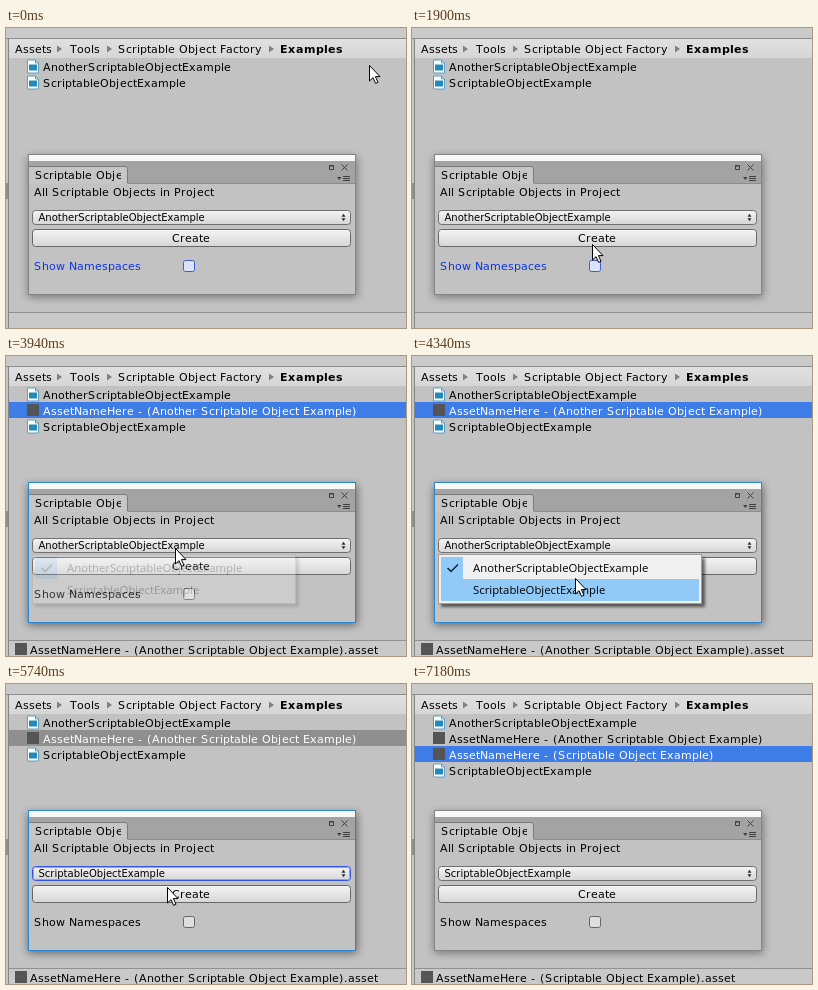
Recreate the animation shown at these times as an HTML page. Size 400x300 px, loop 7.32 s.

```html
<!DOCTYPE html>
<html lang="en">
<head>
<meta charset="utf-8">
<title>Scriptable object factory</title>
<style>
html, body { margin: 0; width: 100%; height: 100%; overflow: hidden; background: #c2c2c2; }
svg { display: block; width: 400px; height: 300px; }
text { font: 11px "DejaVu Sans", sans-serif; white-space: pre; }
text.bold { font-weight: bold; }
text.small { font-size: 10px; }
text.menu { font: 11.35px "Open Sans", sans-serif; }
</style>
</head>
<body>
<svg viewBox="0 0 400 300" xmlns="http://www.w3.org/2000/svg">
  <defs>
    <linearGradient id="face" x2="0" y2="1">
      <stop offset="0" stop-color="#f4f4f4"/><stop offset="1" stop-color="#d6d6d6"/>
    </linearGradient>
    <linearGradient id="pressed" x2="0" y2="1">
      <stop offset="0" stop-color="#b0b0b0"/><stop offset="1" stop-color="#c8c8c8"/>
    </linearGradient>
    <linearGradient id="bar" x2="0" y2="1">
      <stop offset="0" stop-color="#e0e0e0"/><stop offset="1" stop-color="#d6d6d6"/>
    </linearGradient>
    <filter id="blur" x="-10%" y="-20%" width="120%" height="140%"><feGaussianBlur stdDeviation="4"/></filter>
    <filter id="soft" x="-10%" y="-20%" width="120%" height="140%"><feGaussianBlur stdDeviation="1.5"/></filter>
    <clipPath id="tab"><rect x="22" y="136" width="93" height="20"/></clipPath>
  </defs>
  <g id="back"></g>
  <g id="list"></g>
  <g id="panel"></g>
  <g id="popup"></g>
  <path id="cursor" d="M.5.5V16L4 12.6 6.6 18.4 9 17.3 6.4 11.6H11Z" fill="#fff" stroke="#000" stroke-width="1"/>
</svg>
<script>
const LOOP = 7320, STEP = 20;
const SCRIPTS = ['AnotherScriptableObjectExample', 'ScriptableObjectExample'];
const ASSETS = ['AssetNameHere - (Another Scriptable Object Example)', 'AssetNameHere - (Scriptable Object Example)'];

// Moments at which the state of the editor changes
const PRESS_1 = 2040, MAKE_1 = 2120, NAME_1 = 2880;
const OPEN = 3940, HOVER = 4300, PICK = 4620;
const PRESS_2 = 5820, MAKE_2 = 5900, NAME_2 = 6380;

// Pointer strokes, each a list of [time, x, y]
const STROKES = [
  [[0, 363, 37], [120, 335, 26], [320, 180, 18], [500, 28, 30], [580, 1, 48], [740, 45, 77],
   [920, 111, 85], [1060, 190, 68], [1130, 206, 44], [1210, 170, 18], [1300, 134, 60], [1480, 138, 204],
   [1640, 164, 231], [1780, 187, 226], [1900, 180, 216]],
  [[2400, 180, 216], [2500, 186, 160], [2620, 195, 97]],
  [[3400, 195, 97], [3580, 182, 150], [3740, 170, 199], [3800, 169, 192]],
  [[4240, 169, 192], [4380, 162, 230]],
  [[4600, 162, 230], [4720, 159, 220], [5000, 153, 203], [5340, 150, 188], [5440, 150, 182], [5600, 160, 200]],
  [[5720, 160, 200], [5740, 161, 203], [5800, 166, 208]],
  [[5980, 166, 208], [6160, 172, 160], [6340, 176, 116]],
  [[6900, 176, 116], [7040, 255, 75], [7180, 402, 33]]
];

const $ = id => document.getElementById(id);
const clamp = (v, a = 0, b = 1) => Math.min(b, Math.max(a, v));
const pen = document.createElement('canvas').getContext('2d');

// Whole-pixel advances, as in hinted screen text
function advance(c, bold) {
  pen.font = (bold ? 'bold ' : '') + '110px "DejaVu Sans", sans-serif';
  const w = pen.measureText(c).width / 10;
  return bold ? Math.ceil(w) : Math.round(w) + (' Sj-().'.includes(c) ? 1 : 0);
}
const placed = {};
function label(x, y, s, fill = '#000', bold = false) {
  const key = x + s + bold;
  if (!placed[key]) {
    let at = x;
    placed[key] = [...s].map(c => { const p = at; at += advance(c, bold); return p; }).join(' ');
  }
  return `<text class="${bold ? 'bold' : ''}" x="${placed[key]}" y="${y}" fill="${fill}">${s}</text>`;
}
const span = s => [...s].reduce((w, c) => w + advance(c), 0);
const plain = (x, y, s, cls) => `<text class="${cls}" x="${x}" y="${y}">${s}</text>`;
const rect = (x, y, w, h, fill, more = '') =>
  `<rect x="${x}" y="${y}" width="${w}" height="${h}" fill="${fill}" ${more}/>`;
const path = (d, fill, more = '') => `<path d="${d}" fill="${fill}" ${more}/>`;
const box = (x, y, w, h, fill, line, r = 3) =>
  rect(x + .5, y + .5, w - 1, h - 1, fill, `rx="${r}" stroke="${line}"`);

const scriptIcon = y =>
  path(`M21.5 ${y + 1.5}h8l3 3v10h-11z`, '#fff', 'stroke="#5d9dbb"') +
  path(`M29.5 ${y + 1.5}v3h3`, 'none', 'stroke="#5d9dbb"') +
  rect(23, y + 6, 8, 6, '#2488b8');
const assetIcon = (x, y) => rect(x, y, 12, 12, '#555');

function back() {
  const arrow = x => path(`M${x} 17.5l5 3.5-5 3.5z`, '#808080');
  return rect(0, 0, 400, 300, '#c2c2c2') +
    rect(0, 0, 400, 10, '#cacaca') + rect(0, 10, 400, 1, '#8a8a8a') +
    rect(3, 11, 397, 19, 'url(#bar)') +
    rect(0, 11, 2, 289, '#c6c6c6') + rect(2, 11, 1, 289, '#858585') + rect(0, 155, 2, 16, '#8e8e8e') +
    label(9, 25, 'Assets') + arrow(51) + label(64, 25, 'Tools') + arrow(101) +
    label(112, 25, 'Scriptable Object Factory') + arrow(263) + label(274, 25, 'Examples', '#000', true) +
    rect(3, 284, 397, 16, '#c9c9c9') + rect(3, 284, 397, 1, '#909090');
}

function list(t) {
  const count = t < MAKE_1 ? 0 : t < MAKE_2 ? 1 : 2;
  const naming = (t >= MAKE_1 && t < NAME_1) || (t >= MAKE_2 && t < NAME_2);
  const faded = t >= PICK && t < MAKE_2;
  const names = [SCRIPTS[0], ...ASSETS.slice(0, count), SCRIPTS[1]];
  let out = '';
  names.forEach((name, i) => {
    const y = 30 + i * 16, asset = i > 0 && i <= count;
    const current = count > 0 && i === count;
    const picked = current && !naming;
    if (picked) out += rect(3, y, 397, 16, faded ? '#8f8f8f' : '#3e7de7');
    if (current && naming) {
      out += box(35, y, 366, 16, '#e4e4e4', '#808080', 1) + rect(37, y + 2, span(name), 12, '#78a4e4');
    }
    out += asset ? assetIcon(21, y + 2) : scriptIcon(y + .5);
    out += label(37, y + 13, name, picked ? '#fff' : '#000');
  });
  if (count && !naming) out += assetIcon(9, 287) + label(24, 298, ASSETS[count - 1] + '.asset');
  return out;
}

function panel(t) {
  const focus = (t >= PRESS_1 && t < MAKE_1) || (t >= OPEN && t < MAKE_2);
  const down = (t >= PRESS_1 && t < MAKE_1) || (t >= PRESS_2 && t < MAKE_2);
  const chosen = t >= PICK, toggle = t < PRESS_1;
  const ring = chosen && t < MAKE_2;
  const edge = focus ? '#2a87d0' : '#858585';
  return rect(22, 129, 329, 140, '#000', `opacity="${focus ? .5 : .4}" filter="url(#blur)"`) +
    rect(22, 126, 328, 141, '#c2c2c2') +
    rect(23, 127, 326, 6, '#f8f8f8') + rect(23, 133, 326, 22, '#a3a3a3') +
    rect(23, 155, 326, 1, '#8c8c8c') +
    path('M22.5 156V141q0-2.500 2.500-2.500H119q2.500 0 2.500 2.500V156z', '#c6c6c6') +
    path('M22.500 138.500H119q2.500 0 2.500 2.500V155', 'none', 'stroke="#7c7c7c"') +
    `<g clip-path="url(#tab)">${label(29, 151, 'Scriptable Object')}</g>` +
    path('M323.500 137.500h4v4h-4zM323 138h5M335.500 136.500l6 6M341.500 136.500l-6 6', 'none', 'stroke="#404040"') +
    path('M331 149h4.500l-2.250 3z', '#404040') +
    path('M337 148.500h7M337 150.500h7M337 152.500h7', 'none', 'stroke="#404040"') +
    rect(22.5, 126.5, 327, 140, 'none', `stroke="${edge}"`) +
    label(28, 168, 'All Scriptable Objects in Project') +
    box(26, 182, 319, 15, 'url(#face)', ring ? '#3456e0' : '#707070') +
    (ring ? rect(27.5, 183.5, 316, 12, 'none', 'rx="2" stroke="#8aa4ee"') : '') +
    plain(32.5, 193, SCRIPTS[chosen ? 1 : 0], 'small') +
    path('M335.500 188.700l2-3 2 3zM335.500 190.300l2 3 2-3z', '#303030') +
    box(26, 201, 319, 18, down ? 'url(#pressed)' : 'url(#face)', '#666') +
    label(166, 214, 'Create') +
    label(28, 242, 'Show Namespaces', toggle ? '#0a36e6' : '#000') +
    box(177, 232, 12, 12, toggle ? '#dce3f6' : '#dedede', toggle ? '#3a5fd8' : '#666', 2);
}

function popup(t) {
  if (t < OPEN) return '';
  const hover = rect(29, 223, 258, 22, '#91c9f7');
  const second = plain(61, 238, SCRIPTS[1], 'menu');
  if (t < PICK) {
    const alpha = clamp(.22 + (t - OPEN) / 100 * .78);
    return `<g opacity="${alpha.toFixed(3)}">` +
      rect(29, 202, 264, 49, '#000', 'opacity=".55" filter="url(#soft)"') +
      rect(26.5, 198.5, 263, 49, '#f0f0f0', 'stroke="#a0a0a0"') +
      rect(29, 201, 22, 22, '#91c9f7') +
      path('M35.500 212l3.500 3.500 7-7', 'none', 'stroke="#102040" stroke-width="1.500"') +
      (t >= HOVER ? hover : '') + plain(61, 216, SCRIPTS[0], 'menu') + second + '</g>';
  }
  const alpha = clamp(1 - (t - PICK) / 220);
  return alpha ? `<g opacity="${alpha.toFixed(3)}">${hover}${second}</g>` : '';
}

// Smooth curve through the keys of the running stroke
function pointer(t) {
  const keys = STROKES.filter(s => s[0][0] <= t).pop();
  const last = keys.length - 1;
  if (t >= keys[last][0]) return keys[last].slice(1);
  const i = keys.findIndex((k, n) => t < keys[n + 1][0]);
  const a = keys[i], b = keys[i + 1], dt = b[0] - a[0], u = (t - a[0]) / dt;
  const slope = (n, c) => n === 0 || n === last ? 0 :
    (keys[n + 1][c] - keys[n - 1][c]) / (keys[n + 1][0] - keys[n - 1][0]) * dt;
  return [1, 2].map(c => {
    const d = b[c] - a[c], m = slope(i, c), n = slope(i + 1, c);
    return a[c] + u * (m + u * (3 * d - 2 * m - n + u * (m + n - 2 * d)));
  });
}

const shown = {};
function put(id, markup) {
  if (shown[id] !== markup) $(id).innerHTML = shown[id] = markup;
}

function draw(time) {
  const t = Math.floor(time % LOOP / STEP) * STEP;
  put('list', list(t));
  put('panel', panel(t));
  put('popup', popup(t));
  const [x, y] = pointer(t).map(Math.round);
  $('cursor').setAttribute('transform', `translate(${x} ${y})`);
}

put('back', back());
draw(0);
let start;
requestAnimationFrame(function tick(now) {
  start ??= now;
  draw(Math.max(0, now - start));
  requestAnimationFrame(tick);
});
</script>
</body>
</html>
```
